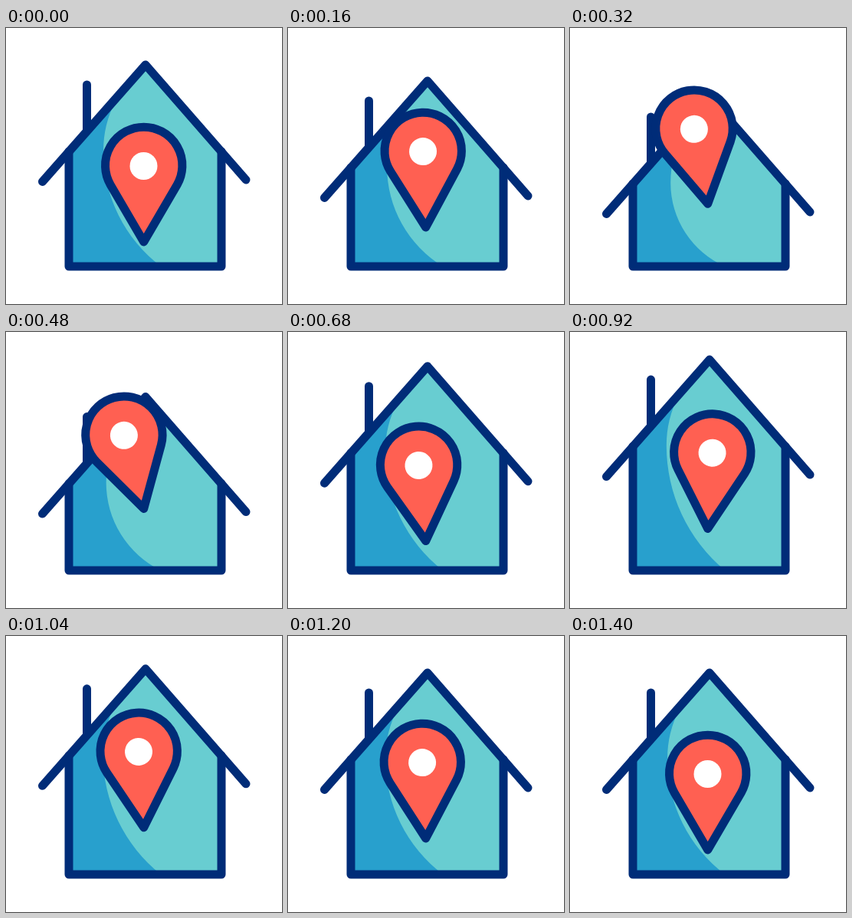
An HTML page for the animation above (2 s loop, 360 px wide and 360 px high).

```html
<!DOCTYPE html>
<html lang="en">
<head>
<meta charset="utf-8">
<title>House and map pin</title>
<style>
  html, body { margin: 0; width: 100%; height: 100%; overflow: hidden; background: #fff; }
  svg { display: block; width: 100vw; height: 100vh; }
  .line { stroke: #002c78; stroke-width: 11; stroke-linecap: round; stroke-linejoin: round; }
</style>
</head>
<body>
<svg viewBox="0 0 360 360">
  <path id="body" fill="#68cdd1"/>
  <path id="shade" fill="#28a0cd"/>
  <path id="walls" class="line" fill="none"/>
  <path id="roof" class="line" fill="none" d="M105.5 74V132M47.5 200.5L182 48L313 198"/>
  <g id="pin">
    <path class="line" fill="#ff6052" d="M179.7 279L136.2 204.4A50.2 50.2 0 1 1 223.2 204.4Z"/>
    <circle cx="179.5" cy="180" r="18" fill="#fff"/>
  </g>
</svg>
<script>
  const LOOP = 2000, STEP = 40;

  // [time in ms, value]
  const squash = [[0, 0], [320, 42], [400, 42], [800, -15], [1200, 0]];
  const hop = [[0, 0], [400, 55], [760, 0], [1000, 30], [1400, 0]];
  const tilt = [[60, 0], [480, -15], [880, 4.5], [1060, -4], [1400, 0]];

  const ease = p => (1 - Math.cos(Math.PI * p)) / 2;

  function valueAt(keys, t) {
    const i = keys.findIndex(k => k[0] > t);
    if (i === 0) return keys[0][1];
    if (i < 0) return keys[keys.length - 1][1];
    const [t0, a] = keys[i - 1], [t1, b] = keys[i];
    return a + (b - a) * ease((t - t0) / (t1 - t0));
  }

  const set = (id, name, value) => document.getElementById(id).setAttribute(name, value);

  function draw(t) {
    const d = valueAt(squash, t);
    const eaves = 161 + d;
    set('roof', 'transform', `translate(0 ${d})`);
    set('walls', 'd', `M82 ${eaves}V311H281V${eaves}`);
    set('body', 'd', `M82 ${eaves}L182 ${48 + d}L281 ${eaves}V311H82Z`);

    // The shadow edge is an arc from the floor to its leftmost point, then on to the roof.
    const x = 127 + d * 0.1, y = 160 + d;
    const w = 202 - x, h = 311 - y;
    const r = (w * w + h * h) / (2 * w);
    set('shade', 'd', `M82 311H202A${r} ${r} 0 0 1 ${x} ${y}A140 140 0 0 1 ${x + 16} ${y - 65}L82 ${eaves}Z`);

    set('pin', 'transform', `translate(0 ${-valueAt(hop, t)}) rotate(${valueAt(tilt, t)} 179.7 279)`);
  }

  const start = performance.now();
  function tick() {
    const t = (performance.now() - start) % LOOP;
    draw(Math.floor(t / STEP) * STEP);
    requestAnimationFrame(tick);
  }
  tick();
</script>
</body>
</html>
```
